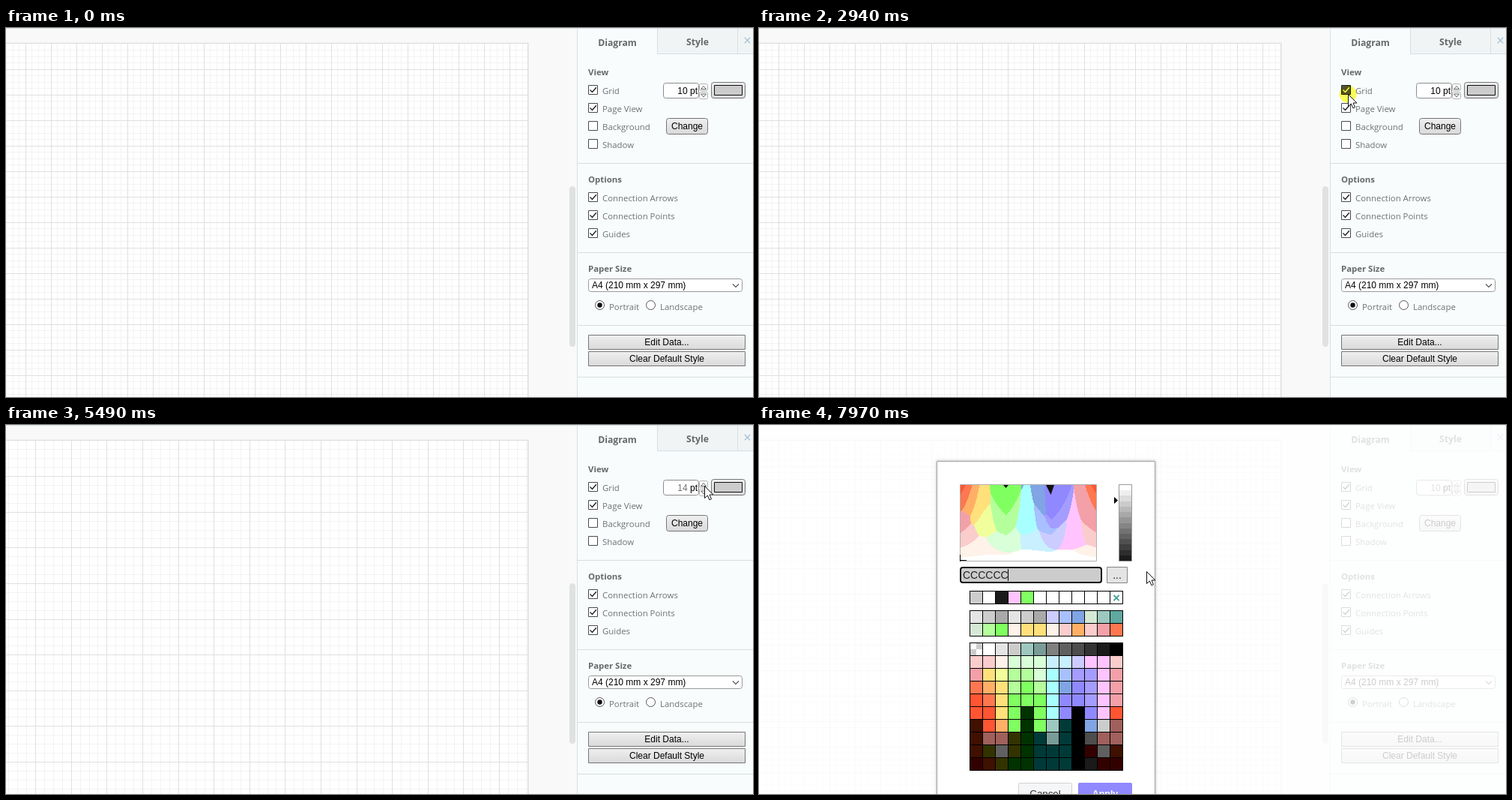
Animation, 997 px wide and 492 px high, one loop 8 s. Source, as an HTML page with a canvas:

```html
<!DOCTYPE html>
<html lang="en">
<head>
<meta charset="utf-8">
<title>Diagram grid settings</title>
<style>
html, body { margin: 0; width: 100%; height: 100%; overflow: hidden; background: #fff; }
canvas { display: block; }
</style>
</head>
<body>
<canvas id="stage" width="997" height="492"></canvas>
<script>
const LOOP = 8000;
const ctx = document.getElementById('stage').getContext('2d');
const UI = '"Open Sans", sans-serif';
const ARIAL = '"Liberation Sans", Arial, sans-serif';

// Mouse presses: down, up, change of grid size (null toggles the grid).
const presses = [
  [1870, 1940, null], [2410, 2470, null], [2940, 3010, null], [3480, 3540, null],
  [4690, 4760, 1], [4900, 5030, 1], [5090, 5160, 1], [5360, 5430, 1],
  [6170, 6300, -1], [6370, 6440, -1], [6580, 6640, -1], [6910, 6980, -1],
  [7380, 7440, 0]
];
const DIALOG_AT = 7440;

// Pointer moves: first step, last step, number of steps, bend, end point.
const pointerStart = [933, 466];
const moves = [
  [460, 1250, 13, [840, 225], [808, 117]],
  [1310, 1590, 5, [806, 79], [786, 88]],
  [3810, 4500, 10, [860, 88], [932, 81]],
  [5560, 5690, 3, [933, 84], [934, 88]],
  [7110, 7180, 2, [948, 87], [961, 86]],
  [7770, 7970, 4, [740, 130], [517, 195]]
];

function rect(x, y, w, h, fill) {
  ctx.fillStyle = fill;
  ctx.fillRect(x, y, w, h);
}

function box(x, y, w, h, fill, stroke, r = 0, line = 1) {
  ctx.beginPath();
  ctx.roundRect(x + line / 2, y + line / 2, w - line, h - line, r);
  ctx.fillStyle = fill;
  ctx.fill();
  ctx.lineWidth = line;
  ctx.strokeStyle = stroke;
  ctx.stroke();
}

function poly(points, stroke, width = 1, fill = null, close = false) {
  ctx.beginPath();
  points.forEach(([x, y]) => ctx.lineTo(x, y));
  if (close) ctx.closePath();
  if (fill) { ctx.fillStyle = fill; ctx.fill(); }
  if (stroke) { ctx.strokeStyle = stroke; ctx.lineWidth = width; ctx.stroke(); }
}

function text(s, x, y, font, color, align = 'left') {
  ctx.font = font;
  ctx.fillStyle = color;
  ctx.textAlign = align;
  ctx.fillText(s, x, y);
}

const label = (s, x, y) => text(s, x, y, '11.4px ' + UI, '#6f7173');
const heading = (s, y) => text(s, 777, y, 'bold 11.4px ' + UI, '#66686a');

function cross(x, y, r, color, width) {
  poly([[x - r, y - r], [x + r, y + r]], color, width);
  poly([[x - r, y + r], [x + r, y - r]], color, width);
}

function button(s, x, y, w, h, r, hover) {
  const g = ctx.createLinearGradient(0, y, 0, y + h);
  g.addColorStop(0, hover ? '#f8f8f8' : '#f0f0f0');
  g.addColorStop(1, hover ? '#e2e2e2' : '#d9d9d9');
  box(x, y, w, h, g, hover ? '#444' : '#767676', r);
  text(s, x + w / 2, y + h / 2 + 4, '12px ' + ARIAL, '#000', 'center');
}

function checkbox(y, checked, pressed) {
  box(777, y, 13, 13, pressed ? '#555' : '#fff', pressed ? '#222' : '#4a4a4a');
  if (checked) {
    poly([[779.5, y + 6.5], [782.5, y + 9.5], [787.8, y + 3.2]], pressed ? '#fff' : '#222', 1.4);
  }
}

function radio(x, y, on) {
  ctx.beginPath();
  ctx.arc(x, y, 6, 0, 7);
  ctx.fillStyle = '#fff';
  ctx.fill();
  ctx.lineWidth = 1;
  ctx.strokeStyle = '#555';
  ctx.stroke();
  if (on) {
    ctx.beginPath();
    ctx.arc(x, y, 3.2, 0, 7);
    ctx.fillStyle = '#111';
    ctx.fill();
  }
}

function drawPage(gridOn, size) {
  rect(0, 0, 762, 492, '#f9f9f9');
  rect(0, 19, 698, 1, '#f1f1f1');
  rect(697, 20, 1, 472, '#ececec');
  rect(0, 20, 697, 472, '#dedede');
  rect(0, 21, 696, 471, '#fff');
  if (gridOn) {
    const step = size * 0.85;
    for (const major of [false, true]) {
      const color = major ? '#e0e0e0' : '#f3f3f3';
      for (let i = 1; i * step < 720; i++) {
        if ((i % 4 === 0) !== major) continue;
        const x = Math.floor(i * step - 8 + 0.01);
        const y = Math.floor(i * step + 21 + 0.01);
        if (x >= 0 && x < 696) rect(x, 21, 1, 471, color);
        if (y < 492) rect(0, y, 696, 1, color);
      }
    }
  }
  box(752, 211, 8, 214, '#dfe1e2', '#dfe1e2', 3.5);
}

function drawSpinner(s) {
  box(877, 73, 48, 21, '#fff', '#8c8c8c', 3);
  text(' pt', 923, 88, '12px ' + ARIAL, '#000', 'right');
  const w = ctx.measureText(' pt').width;
  text(s.size, 923 - w, 88, '12px ' + ARIAL, s.edited ? '#707070' : '#000', 'right');
  box(925, 74, 12, 10, '#f8fafa', '#b5b5b5', 2);
  box(925, 85, 12, 10, '#f8fafa', '#b5b5b5', 2);
  poly([[927.5, 81.5], [931, 77.5], [934.5, 81.5]], '#666', 1, '#fff', true);
  poly([[927.5, 88], [931, 92], [934.5, 88]], '#666', 1, '#fff', true);
  button('', 941, 72, 46, 22, 3, s.hover('color'));
  box(945, 76, 38, 14, '#cccccc', '#111');
}

function drawPanel(s) {
  const edge = '#d8dee1';
  rect(762, 0, 235, 492, '#f8fcfd');
  rect(870, 1, 127, 34, '#f1f4f5');
  rect(762, 0, 1, 492, edge);
  rect(869, 0, 1, 35, edge);
  rect(976, 0, 1, 35, edge);
  rect(869, 34, 128, 1, edge);
  rect(0, 0, 997, 1, edge);
  text('Diagram', 816, 24, 'bold 12.2px ' + UI, '#66686a', 'center');
  text('Style', 923, 23, 'bold 12.2px ' + UI, '#66686a', 'center');
  cross(989.5, 16.5, 3.7, '#a5c6da', 1.4);
  for (const y of [180, 299, 396, 465]) rect(763, y, 234, 1, edge);

  heading('View', 63);
  ['Grid', 'Page View', 'Background', 'Shadow'].forEach((name, i) => {
    const y = 76 + i * 24;
    checkbox(y, i === 0 ? s.gridOn : i === 1, i === 0 && s.pressedGrid);
    label(name, 796, y + 12);
  });
  if (s.gridOn) drawSpinner(s);
  button('Change', 881, 120, 56, 22, 3, false);

  heading('Options', 206);
  ['Connection Arrows', 'Connection Points', 'Guides'].forEach((name, i) => {
    checkbox(219 + i * 24, true, false);
    label(name, 796, 231 + i * 24);
  });

  heading('Paper Size', 325);
  box(777, 334, 206, 18, '#fff', '#9a9a9a', 3);
  text('A4 (210 mm x 297 mm)', 782, 347, '12px ' + ARIAL, '#000');
  poly([[970, 341.5], [974, 345.5], [978, 341.5]], '#555', 1.2);
  radio(792.5, 369.5, true);
  radio(860.5, 369.5, false);
  label('Portrait', 805, 376);
  label('Landscape', 873, 376);

  button('Edit Data...', 777, 409, 210, 20, 0, s.hover('edit'));
  button('Clear Default Style', 777, 431, 210, 20, 0, s.hover('clear'));
}

const swatch = {
  w: '#ffffff', x: '#e4e4e4', g: '#cccccc', h: '#a9a9a9', j: '#808080', k: '#606060',
  l: '#4d4d4d', m: '#333333', n: '#1a1a1a', z: '#000000',
  r: '#ff5533', s: '#ff7750', o: '#ffb066', y: '#ffe07a', f: '#f0ff9c', p: '#fbcccc',
  q: '#f4a0a8', c: '#fff2e8', e: '#80ff60', d: '#b4ff9c', i: '#d8ffd8', a: '#a8ffff',
  b: '#80a4e4', v: '#9088ff', u: '#a49cff', t: '#ccccff', P: '#ffc4ff', T: '#c8f0ff',
  B: '#a8c0ff', S: '#d5e8d4', A: '#9cc8c0', C: '#60a8a0', D: '#7a9c98',
  G: '#003300', H: '#003a38', O: '#333300', R: '#401000', M: '#330000', N: '#a0605c'
};
const recent = ['gwnPewwwwwww'];
const presets = ['xghxghtBbSAC', 'Sdecyycpopqs'];
const chart = [
  'wwxgADjklmnz', 'ppciiiTTtPPp', 'qyfddiaBuuPq', 'soydedabvuPq', 'rsyeeeavvuPq',
  'rryeGeavzvPr', 'RroeGeAHzbgN', 'RNNOGHDHzlNN', 'ROkOGHHHzMkR', 'MROGGHHHznMM'
];

function drawSwatches(rows, y) {
  rect(281, y, 205, rows.length * 17 + 1, '#000');
  rows.forEach((row, j) => [...row].forEach((key, i) =>
    rect(282 + i * 17, y + 1 + j * 17, 16, 16, swatch[key])));
}

// Hue across, saturation down, each point set to the nearest swatch.
function makeSpectrum(w, h) {
  const c = document.createElement('canvas');
  c.width = w;
  c.height = h;
  const g = c.getContext('2d');
  const palette = [...'rsoypqcedfiabvutPTBw'].map(key => {
    const n = parseInt(swatch[key].slice(1), 16);
    return { fill: swatch[key], rgb: [n >> 16, n >> 8 & 255, n & 255] };
  });
  for (let x = 0; x < w; x++) {
    const hue = x / w * 6;
    const pure = [5, 3, 1].map(n => {
      const k = (n + hue) % 6;
      return Math.max(0, Math.min(k, 4 - k, 1));
    });
    for (let y = 0; y < h; y++) {
      const sat = 0.75 * (1 - y / h);
      const rgb = pure.map(v => 255 * (1 - sat * v));
      let best = Infinity;
      for (const p of palette) {
        const d = p.rgb.reduce((sum, v, i) => sum + (v - rgb[i]) ** 2, 0);
        if (d < best) { best = d; g.fillStyle = p.fill; }
      }
      g.fillRect(x, y, 1, 1);
    }
  }
  return c;
}
const spectrum = makeSpectrum(181, 101);

function drawDialog() {
  rect(0, 0, 997, 492, 'rgba(255,255,255,0.8)');
  ctx.save();
  ctx.shadowColor = 'rgba(0,0,0,0.3)';
  ctx.shadowBlur = 4;
  rect(237, 48, 292, 460, '#fff');
  ctx.restore();
  box(237, 48, 292, 460, '#fff', '#a2a2a2');

  box(268, 79, 183, 103, '#fff', '#b0b0b0');
  ctx.drawImage(spectrum, 269, 80);
  poly([[326, 80], [333, 80], [329.5, 84]], null, 1, '#111', true);
  poly([[383, 80], [394, 80], [389.5, 93]], null, 1, '#111', true);
  rect(268, 173, 1, 9, '#000');
  rect(268, 180, 9, 1, '#000');

  box(480, 79, 18, 103, '#fff', '#999');
  for (let i = 0; i < 14; i++) {
    const v = Math.round(255 - i * 17.5);
    const y = 80 + Math.round(i * 101 / 14);
    rect(481, y, 16, 80 + Math.round((i + 1) * 101 / 14) - y, `rgb(${v},${v},${v})`);
  }
  poly([[474, 96], [474, 105], [479, 100.5]], null, 1, '#000', true);

  box(268, 189, 190, 22, '#cccccc', '#111', 3, 2);
  text('CCCCCC', 272, 205, '14px ' + ARIAL, '#222');
  rect(332, 192, 1, 16, '#000');
  box(464, 189, 28, 22, '#e4e4e4', '#858585');
  text('...', 478, 205, '14px ' + ARIAL, '#222', 'center');

  drawSwatches(recent, 221);
  cross(477, 230.5, 3.6, '#4a9c98', 2);
  drawSwatches(presets, 247);
  drawSwatches(chart, 290);
  rect(290, 291, 8, 8, '#ccc');
  rect(282, 299, 8, 8, '#ccc');

  box(346, 477, 72, 30, '#f5f6f7', '#d2d2d2', 1);
  text('Cancel', 382, 496, '13.3px ' + ARIAL, '#333', 'center');
  box(426, 477, 72, 30, swatch.v, swatch.v, 1);
  text('Apply', 462, 496, 'bold 12.4px ' + ARIAL, '#fff', 'center');
}

function pointerAt(t) {
  if (t < moves[0][0]) return null;
  let from = pointerStart;
  for (const [start, end, steps, bend, to] of moves) {
    if (t < start) break;
    const k = Math.floor((t - start) / (end - start) * (steps - 1) + 0.01);
    if (k < steps - 1) {
      const p = (k + 1) / steps;
      const u = p * p * (3 - 2 * p);
      return from.map((a, i) =>
        Math.round((1 - u) ** 2 * a + 2 * u * (1 - u) * bend[i] + u * u * to[i]));
    }
    from = to;
  }
  return from;
}

function drawPointer([x, y], down) {
  if (down) {
    ctx.save();
    ctx.globalCompositeOperation = 'multiply';
    ctx.beginPath();
    ctx.arc(x, y, 11.5, 0, 7);
    ctx.fillStyle = '#ffff55';
    ctx.fill();
    ctx.restore();
  }
  const shape = [[0, 0], [0, 16], [3.8, 12.5], [6.4, 18.3], [9, 17.2], [6.5, 11.5], [11.4, 11.5]];
  poly(shape.map(([dx, dy]) => [x + dx + 0.5, y + dy + 0.5]), '#111', 1, '#fff', true);
}

const zones = {
  edit: [777, 409, 210, 20],
  clear: [777, 431, 210, 20],
  color: [941, 72, 46, 22]
};

function stateAt(t) {
  const pointer = pointerAt(t);
  const s = { gridOn: true, size: 10, edited: false, down: false, pressedGrid: false, pointer };
  for (const [start, end, change] of presses) {
    if (t >= start && t < end) {
      s.down = true;
      s.pressedGrid = change === null;
    }
    if (t < end) break;
    if (change === null) s.gridOn = !s.gridOn;
    else {
      s.size += change;
      s.edited = true;
    }
  }
  s.hover = name => {
    const [x, y, w, h] = zones[name];
    return pointer !== null && t < DIALOG_AT &&
      pointer[0] >= x && pointer[0] < x + w && pointer[1] >= y && pointer[1] < y + h;
  };
  return s;
}

function draw(t) {
  const s = stateAt(t);
  drawPage(s.gridOn, s.size);
  drawPanel(s);
  if (t >= DIALOG_AT) drawDialog();
  if (s.pointer) drawPointer(s.pointer, s.down);
}

const begin = performance.now();
function frame() {
  draw((performance.now() - begin) % LOOP);
  requestAnimationFrame(frame);
}
frame();
</script>
</body>
</html>
```
